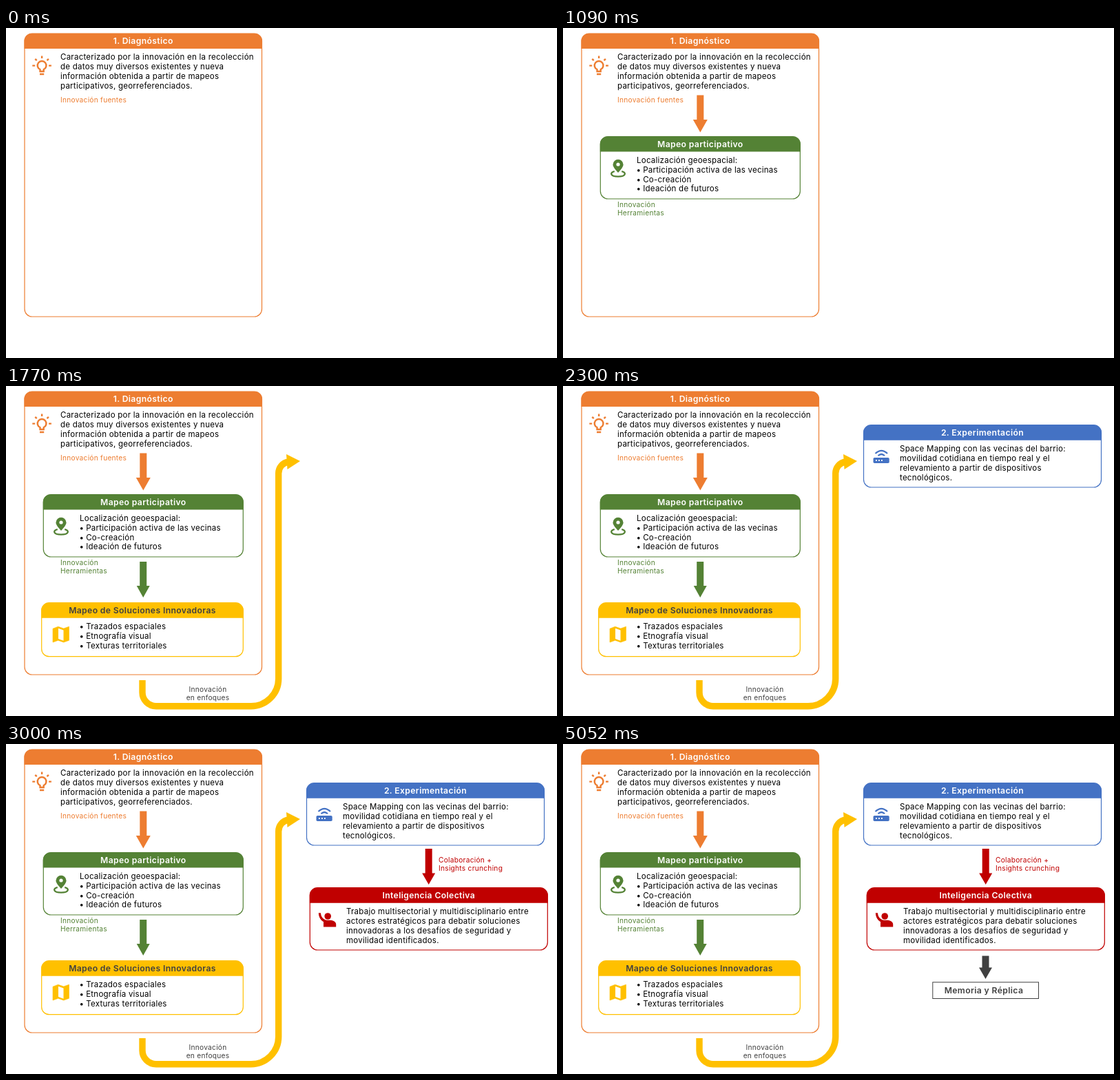
Write an HTML page that moves like this. It is 800 px wide and 479 px high and loops after 6000 ms.

```html
<!DOCTYPE html>
<html lang="es">
<head>
<meta charset="utf-8">
<title>Proceso</title>
<style>
html, body { margin: 0; width: 100%; height: 100%; overflow: hidden; background: #fff; }
svg { display: block; width: 100%; height: 100%; font-family: Inter, "Open Sans", sans-serif; font-size: 11.5px; letter-spacing: .25px; }
.title { font-size: 12.2px; font-weight: 600; letter-spacing: .36px; text-anchor: middle; }
.label { font-size: 10.2px; }
</style>
</head>
<body>
<svg id="stage" viewBox="0 0 800 479"></svg>
<script>
const LOOP = 6000;
const ORANGE = '#ED7D31', GREEN = '#548235', YELLOW = '#FFC000';
const BLUE = '#4472C4', RED = '#C00000', GREY = '#404040';

const text = (x, y, s, attrs = '') => `<text x="${x}" y="${y}" ${attrs}>${s}</text>`;
const lines = (x, y, rows, step = 13.9, attrs = '') =>
  rows.map((s, i) => text(x, y + i * step, s, attrs)).join('');
const bullets = (x, y, rows) =>
  lines(x - .6, y, rows.map(() => '•')) + lines(x + 9.2, y, rows);
const label = (x, y, rows, color, anchor = 'start') =>
  lines(x, y, rows, 12.2, `class="label" fill="${color}" text-anchor="${anchor}"`);

// Rounded card with a filled title bar
function card(x, y, w, h, color, title, ink = '#fff') {
  const r = 11, bar = 22;
  return `<rect x="${x}" y="${y}" width="${w}" height="${h}" rx="${r}" fill="#fff" stroke="${color}" stroke-width="1.2"/>
    <path d="M${x - .5} ${y + bar}v${r - bar}a${r} ${r} 0 0 1 ${r} ${-r}h${w + 1 - 2 * r}a${r} ${r} 0 0 1 ${r} ${r}v${bar - r}z" fill="${color}"/>
    ${text(x + w / 2, y + 15, title, `class="title" fill="${ink}"`)}`;
}

function arrow(x, top, neck, tip, half, color) {
  const s = 5;
  return `<path d="M${x - s} ${top}h${2 * s}V${neck}H${x + half}L${x} ${tip}L${x - half} ${neck}H${x - s}z" fill="${color}"/>`;
}

const bulb = `<g fill="none" stroke="${ORANGE}" stroke-width="2.4">
  <path d="M49.5 63V60.2A6.4 6.4 0 1 1 54.7 60.2V63z"/>
  <path d="M49 67h6.2M52.1 40.4v3.6M38.3 54.6h3.9M62 54.6h3.9M42.300 44.800l2.400 2.400M61.900 44.800l-2.400 2.400"/></g>`;

const pin = `<path d="M80 210C75.500 205 72.500 201.500 72.500 198.200a7.500 7.500 0 0 1 15 0C87.500 201.500 84.500 205 80 210z" fill="${GREEN}"/>
  <circle cx="80" cy="198" r="2.600" fill="#fff"/>
  <path d="M74.800 208.200C67.800 209.500 68 215.700 80 215.700S92.200 209.500 85.200 208.200" fill="none" stroke="${GREEN}" stroke-width="2.300"/>`;

const map = `<path d="M68 352.200L75.700 349.200L83.700 352L91.500 349.200V369.200L83.700 372L75.700 369.200L68 372z" fill="${YELLOW}" stroke="${YELLOW}" stroke-width=".6" stroke-linejoin="round"/>
  <path d="M76 351.800l7.500 2.700v15.200l-7.500 -2.700z" fill="#fff"/>`;

const router = `<g fill="none" stroke="${BLUE}" stroke-width="2.200">
  <path d="M453.500 98Q462.300 89.600 471 98M457.500 101.300Q462.300 96.700 467 101.300"/></g>
  <rect x="450.500" y="104" width="23.200" height="8" rx="1.800" fill="${BLUE}"/>
  <path d="M454 108h1.800M458 108h1.800M462 108h1.800" stroke="#fff" stroke-width="1.800"/>`;

const person = `<g fill="${RED}"><circle cx="467.200" cy="250" r="4.800"/>
  <path d="M453.800 245.300h3.200c.3 5.500 3.500 9.900 9 10.400h5.500c4.500.6 7.700 2.700 7.700 5.800v3.900h-18.200v-7.400c-4.500-2.300-7-7-7.200-12.700z"/></g>`;

const bend = `<path d="M198 427V444.700A20 20 0 0 0 218 464.700H355.700A40 40 0 0 0 395.700 424.700V127A17 17 0 0 1 410 110" fill="none" stroke="${YELLOW}" stroke-width="9.400"/>
  <path d="M407 99L427 109L408.500 121z" fill="${YELLOW}"/>`;

// Each step appears at its time and stays until the loop ends
const steps = [
  [0, card(27, 8, 344.5, 411, ORANGE, '1. Diagnóstico') + bulb +
    lines(79, 46.1, [
      'Caracterizado por la innovación en la recolección',
      'de datos muy diversos existentes y nueva',
      'información obtenida a partir de mapeos',
      'participativos, georreferenciados.']) +
    label(79, 108, ['Innovación fuentes'], ORANGE)],
  [670, arrow(199.3, 97.5, 133, 151.5, 10.5, ORANGE) +
    card(54.3, 157.5, 290, 90.5, GREEN, 'Mapeo participativo') + pin +
    text(107, 195.7, 'Localización geoespacial:') +
    bullets(107, 209.6, ['Participación activa de las vecinas', 'Co-creación', 'Ideación de futuros']) +
    label(79, 259.7, ['Innovación', 'Herramientas'], GREEN)],
  [1370, arrow(199.2, 255, 290, 307, 9.5, GREEN) +
    card(51.7, 314.7, 292.6, 78, YELLOW, 'Mapeo de Soluciones Innovadoras', GREY) + map +
    bullets(107, 353, ['Trazados espaciales', 'Etnografía visual', 'Texturas territoriales'])],
  [1770, bend + label(293, 443.8, ['Innovación', 'en enfoques'], GREY, 'middle')],
  [2300, card(436.5, 56.7, 345, 90.3, BLUE, '2. Experimentación') + router +
    lines(489, 94.8, [
      'Space Mapping con las vecinas del barrio:',
      'movilidad cotidiana en tiempo real y el',
      'relevamiento a partir de dispositivos',
      'tecnológicos.'])],
  [3000, arrow(613.7, 152, 187.5, 204, 9.5, RED) +
    label(628, 171.7, ['Colaboración +', 'Insights crunching'], RED) +
    card(441.3, 208.7, 345, 90.3, RED, 'Inteligencia Colectiva') + person +
    lines(494, 247.2, [
      'Trabajo multisectorial y multidisciplinario entre',
      'actores estratégicos para debatir soluciones',
      'innovadoras a los desafíos de seguridad y',
      'movilidad identificados.'])],
  [3630, arrow(613.5, 307.5, 324.5, 341, 9.5, GREY) +
    `<rect x="536.800" y="345.800" width="153.700" height="23.700" fill="#fff" stroke="${GREY}"/>` +
    text(611, 362, 'Memoria y Réplica', `class="title" fill="${GREY}"`)]
];

const stage = document.getElementById('stage');
stage.innerHTML = steps.map(([, art]) => `<g>${art}</g>`).join('');
const groups = [...stage.children];

function draw(t) {
  groups.forEach((g, i) => g.setAttribute('visibility', t >= steps[i][0] ? 'visible' : 'hidden'));
}

const start = performance.now();
function tick() {
  draw((performance.now() - start) % LOOP);
  requestAnimationFrame(tick);
}
tick();
</script>
</body>
</html>
```
